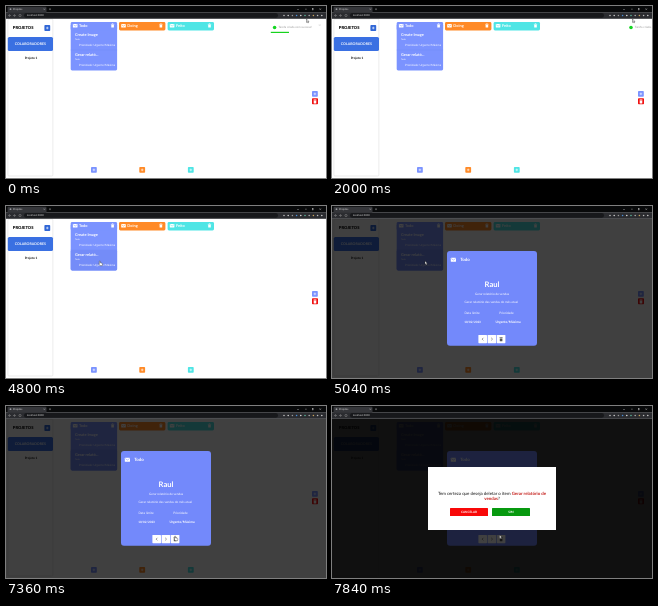
These frames come from a looping animation (320x172 px, 8000 ms). An HTML page:

```html
<!DOCTYPE html>
<html lang="pt">
<head>
<meta charset="utf-8">
<style>
html, body { margin: 0; width: 100%; height: 100%; overflow: hidden; background: #fff; }
svg { display: block; width: 100vw; height: 100vh; }
text { font-family: Lato, "Open Sans", sans-serif; text-rendering: geometricPrecision; white-space: pre; }
</style>
</head>
<body>
<svg id="stage" viewBox="0 0 320 172"></svg>
<script>
const LOOP = 8000;
const BLUE = '#7b93ff', ORANGE = '#ff8a27', CYAN = '#4fe5e5';

const rect = (x, y, w, h, fill, r = 0, more = '') =>
  `<rect x="${x}" y="${y}" width="${w}" height="${h}" rx="${r}" fill="${fill}" ${more}/>`;
const dot = (x, y, r, fill) => `<circle cx="${x}" cy="${y}" r="${r}" fill="${fill}"/>`;
const line = (d, color, w = .6) => `<path d="${d}" fill="none" stroke="${color}" stroke-width="${w}"/>`;
const text = (x, y, size, str, fill = '#fff', weight = 400, anchor = 'start') =>
  `<text x="${x}" y="${y}" font-size="${size}" fill="${fill}" font-weight="${weight}" text-anchor="${anchor}">${str}</text>`;
const mid = (x, y, size, str, fill, weight) => text(x, y, size, str, fill, weight, 'middle');
const group = (id, body) => `<g id="${id}">${body}</g>`;

const trash = (x, y, color = '#fff') =>
  rect(x, y + .5, 3.4, .6, color) + rect(x + 1.1, y, 1.2, .5, color) + rect(x + .4, y + 1.4, 2.6, 2.8, color, .3);
const plus = (x, y, color = '#fff') => line(`M${x - 1.3} ${y}h2.6M${x} ${y - 1.3}v2.6`, color, .6);
const mail = (x, y, w, color) =>
  rect(x, y, w, w * .78, '#fff', .5) + line(`M${x + .4} ${y + .7}l${w / 2 - .4} ${w * .3}l${w / 2 - .4} ${-w * .3}`, color, .5);
const addButton = (x, y, color) => rect(x, y, 5.8, 5.8, color, .8) + plus(x + 2.9, y + 2.9);

function browser() {
  const icons = ['#bbb', '#ccc', '#999', '#4b8fd8', '#ddd', '#5ab39a', '#aaa', '#c9a45c', '#bbb', '#ccc'];
  return rect(0, 0, 320, 6.3, '#08090a') + rect(1.5, .8, 39, 6, '#35363a', 1) +
    dot(4.5, 3.2, .9, '#9a9ca0') + text(7, 4.2, 2.6, 'Projetos', '#ddd') +
    line('M37.6 2.4l1.6 1.6m0-1.6l-1.6 1.6', '#bbb', .35) + line('M43 3.2h2m-1-1v2', '#bbb', .35) +
    line('M291 3l1 1l1-1M299 3.2h1.8M313.4 2.4l1.7 1.7m0-1.7l-1.7 1.7', '#bbb', .4) +
    rect(306.2, 2.4, 1.6, 1.6, 'none', 0, 'stroke="#bbb" stroke-width=".35"') +
    rect(0, 6.2, 320, 6.6, '#2b2c30') + rect(18, 7, 254, 4.8, '#17181b', 2.4) +
    line('M4 8.2l-1.4 1.3l1.4 1.3m-1.4-1.3h2.4M8 8.2l1.4 1.3l-1.4 1.3m1.4-1.3h-2.4', '#aaa', .4) +
    `<circle cx="14" cy="9.5" r="1.1" fill="none" stroke="#aaa" stroke-width=".4"/>` +
    text(21, 10.4, 2.6, 'localhost:3000', '#ddd') +
    icons.map((c, i) => dot(278 + i * 4.2, 9.5, .8, c)).join('');
}

function column(x, name, color) {
  return rect(x, 16, 46.4, 8.4, color, 1.4) + mail(x + 2.2, 18, 4.6, color) +
    text(x + 8.3, 21.4, 3.9, name, '#fff', 700) + trash(x + 40.2, 17.4) + addButton(x + 20.3, 161, color);
}

function card(y, title) {
  return text(69, y + 5.7, 3.9, title, '#fff', 700) + text(69, y + 10, 2.2, 'Todo') +
    text(73, y + 16.3, 2.9, 'Prioridade: Urgente/Máxima');
}

function page() {
  return rect(0, 12.8, 320, 160, '#fff') +
    rect(1.9, 13, 45, 157, '#fff', 1, 'stroke="#dedede" stroke-width=".6"') +
    text(6.8, 23.4, 4.1, 'PROJETOS', '#111', 900) +
    rect(38.4, 19, 5.8, 6, '#3167d6', .8) + plus(41.3, 22) +
    rect(1.8, 31, 45.2, 14, '#3a70e2', 1.6) + mid(24.4, 39.2, 3.55, 'COLABORADORES', '#fff', 700) +
    mid(25, 53.2, 3.1, 'Projeto 1', '#111', 700) +
    rect(64.7, 18, 46.4, 46.4, BLUE, 1.4) + rect(64.7, 43.8, 46.4, .4, '#6f87f3') +
    group('hover', rect(64.7, 44, 46.4, 20.4, '#748cf8', 1.4)) +
    column(64.7, 'Todo', BLUE) + column(113, 'Doing', ORANGE) + column(161.6, 'Feito', CYAN) +
    card(24, 'Create Image') + card(44, 'Gerar relató...') +
    addButton(306, 85, BLUE) + rect(306, 92.3, 6, 5.9, '#f01010', .8) + trash(307.3, 93.2);
}

function toast() {
  return rect(264.2, 16, 53.4, 11, '#fff') + dot(268.6, 21.5, 1.8, '#14d522') +
    text(272.4, 22.4, 2.9, 'Tarefa criada com sucesso!', '#999') +
    line('M313 18.4l1.4 1.4m0-1.4l-1.4 1.4', '#aaa', .35) +
    '<rect id="bar" x="264.8" y="25.8" height="1.2" fill="#16d31d"/>';
}

const shade = () => rect(0, 12.8, 320, 160, '#000', 0, 'opacity=".75"');

function details() {
  const keys = [146.4, 155.6, 164.8].map(x => rect(x, 129, 8.6, 8.2, '#fff', .6)).join('');
  return shade() + rect(115, 45, 90, 94.8, '#7389fb', 3) +
    mail(118.8, 51.8, 5.2, '#7389fb') + text(128.2, 55.4, 4.4, 'Todo', '#fff', 700) +
    mid(160, 81, 7.6, 'Raul', '#fff', 700) +
    mid(160, 88.9, 3.1, 'Gerar relatório de vendas') +
    mid(159.2, 97.2, 3.1, 'Gerar relatório das vendas do mês atual') +
    mid(140, 108.2, 3.2, 'Data limite') + mid(174.5, 108.2, 3.2, 'Prioridade') +
    mid(140.5, 116.5, 3, '10/02/2023', '#fff', 700) + mid(176, 116.5, 3.3, 'Urgente/Máxima', '#fff', 700) +
    keys + line('M151.4 131.8l-1.3 1.3l1.3 1.3M159.2 131.8l1.3 1.3l-1.3 1.3', '#555', .6) +
    trash(167.4, 131, '#555');
}

function confirmBox() {
  const red = s => `<tspan fill="#c5201c" font-weight="700">${s}</tspan>`;
  return shade() + rect(96, 61, 128, 63, '#fff') +
    mid(160, 89.3, 4.4, 'Tem certeza que deseja deletar o item ' + red('Gerar relatório de'), '#111') +
    mid(160, 94.2, 4.4, red('vendas') + '?', '#111') +
    rect(118, 102, 38, 8, '#f80808', .6) + mid(137, 107.1, 3.1, 'CANCELAR', '#fff', 700) +
    rect(160, 102, 38, 8, '#07990f', .6) + mid(179, 107.1, 3.1, 'SIM', '#fff', 700);
}

const ink = 'fill="#fff" stroke="#222" stroke-width=".4"';
const pointer = group('arrow', `<path d="M0 0v3.4l.8-.7l.6 1.3l.6-.3l-.6-1.2h1z" ${ink}/>`) +
  group('hand', `<path d="M.8 0q.5 0 .5.5v1.3l1.8.5q.5.2.4.9l-.3 1.5h-2.1l-1.4-1.8q.1-.6.6-.2v-2.2q0-.5.5-.5z" ${ink}/>`);

document.getElementById('stage').innerHTML = page() + group('toast', toast()) +
  group('details', details()) + group('confirm', confirmBox()) + browser() + group('cursor', pointer);

// time, x, y
const path = [
  [0, 300.5, 13], [3520, 300.5, 13], [3840, 289, 17.5], [3920, 289, 17.5], [4160, 171.5, 36],
  [4240, 171.5, 36], [4560, 93, 55], [5520, 93, 55], [5600, 97, 55], [5840, 97, 55],
  [6160, 106, 57], [6400, 108, 58], [6560, 110, 59], [6640, 165, 120], [6960, 165.5, 121],
  [7200, 168.3, 130], [7680, 168.3, 130], [7760, 167.5, 129], [LOOP, 167.5, 129]
];

function cursorAt(t) {
  const i = path.findIndex(p => p[0] > t);
  const [t0, x0, y0] = path[i - 1], [t1, x1, y1] = path[i];
  const k = (t - t0) / (t1 - t0);
  return [x0 + (x1 - x0) * k, y0 + (y1 - y0) * k];
}

const el = id => document.getElementById(id);
const show = (id, on) => el(id).setAttribute('display', on ? 'inline' : 'none');

function draw(now) {
  const t = now % LOOP;
  const leave = Math.max(0, (t - 1780) / 300);
  el('bar').setAttribute('width', Math.max(0, 18.2 * (1 - t / 1840)));
  el('toast').setAttribute('transform', `translate(${56 * leave * leave})`);
  show('toast', leave < 1);
  show('hover', t >= 4560);
  show('details', t >= 5040);
  show('confirm', t >= 7600);
  const hand = t >= 4800 && t < 5040 || t >= 7360 && t < 7600;
  show('hand', hand);
  show('arrow', !hand);
  el('cursor').setAttribute('transform', `translate(${cursorAt(t)})`);
  requestAnimationFrame(draw);
}
requestAnimationFrame(draw);
</script>
</body>
</html>
```
